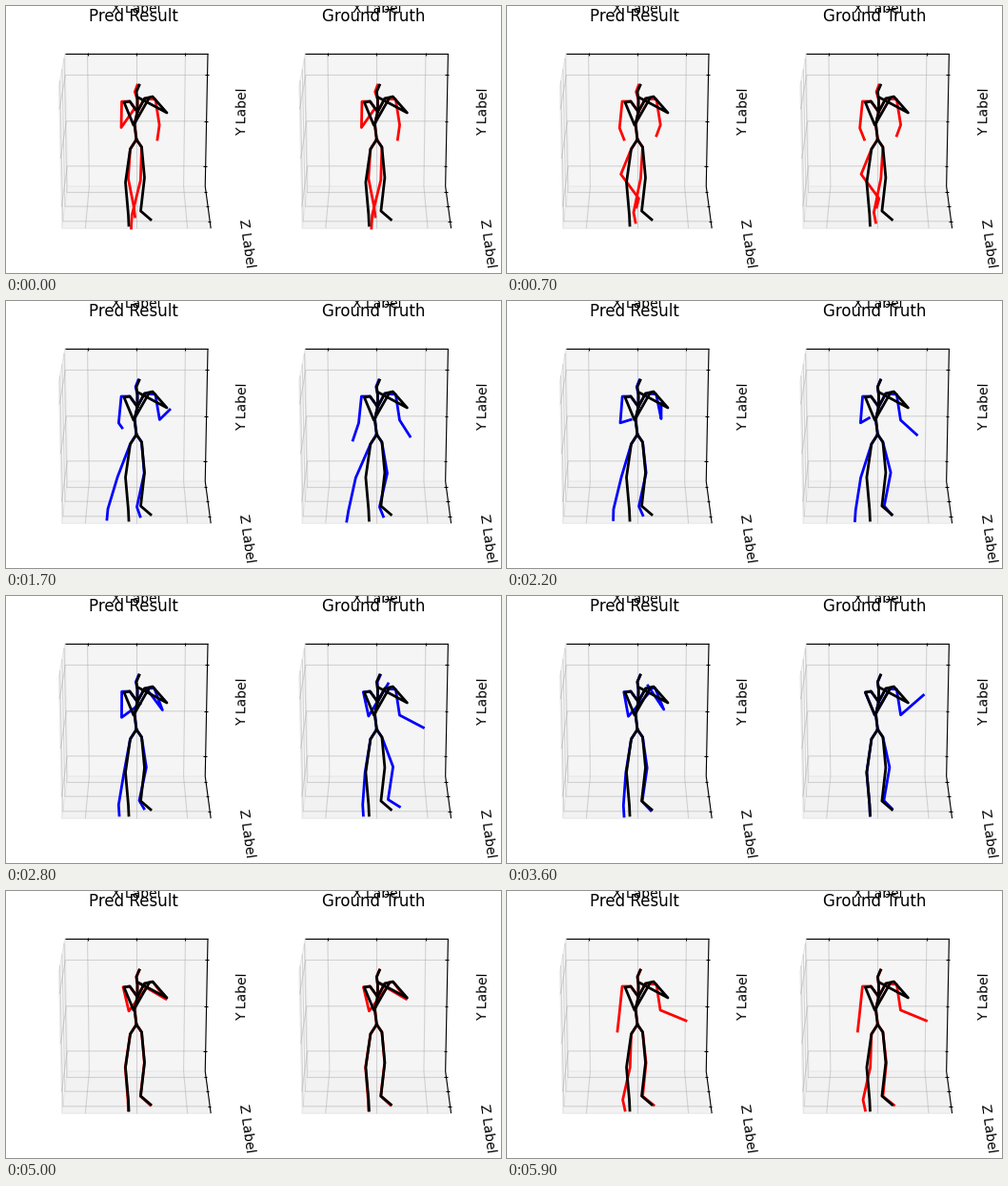
A matplotlib script for the animation above (6 s loop, 520x280 px).

```python
import numpy as np
import matplotlib.pyplot as plt
from matplotlib.animation import FuncAnimation
from matplotlib.collections import LineCollection
from matplotlib.patches import Polygon

WIDTH, HEIGHT, DPI = 520, 280, 100
STEP, FRAMES = 100, 60
PANEL_SHIFT = 252.4
TICKS = (-0.686, 0, 0.686)
TICK_OUT, TICK_IN = 1.3, 2.5
PREDICT_FROM, RESTART = 1000, 5000

plt.rcParams["font.family"] = "DejaVu Sans"


def points(*xy):
    return np.array(xy, float).reshape(-1, 2)


SPINE = points(137, 140, 135, 124, 138, 111)
HEAD = points(138, 98, 137, 90, 140, 83)

# Root, shoulder and elbow when folded, the same when opened
ARMS = {
    "left": (points(138, 111, 130, 100), points(124, 101, 134, 125),
             points(121, 100, 118, 128)),
    "right": (points(138, 111, 145.5, 97), points(154, 95, 169, 112),
              points(157, 98, 161, 125)),
}

# Root, resting knee and ankle, their share of the foot's shift and of the bend
LEGS = {
    "left": (points(137, 140, 130.5, 150), points(125.5, 185, 128.5, 219),
             (0.45, 0.9), (1, -0.4)),
    "right": (points(137, 140, 142.5, 148), points(145.5, 180, 141.5, 215),
              (0.3, 0.5), (1, 0.5)),
}

# Where hands (x, y) and feet (x, y, knee bend) rest
REST = {
    "left_hand": (150, 97),
    "right_hand": (139, 96),
    "left_foot": (129, 230, 0),
    "right_foot": (152, 224, 0),
}

# Key points as (ms, x, y[, bend]); the rest of the body follows
OBSERVED = {
    "left_hand": [(0, 134, 109), (700, 123, 140),
                  (5000, 148, 101), (5600, 118, 147), (5900, 116, 147)],
    "right_hand": [(0, 159, 140), (700, 157, 136),
                   (5000, 140, 97), (5600, 190, 134), (5900, 188, 136)],
    "left_foot": [(0, 135.5, 221, 0), (700, 136, 211, -9),
                  (5000, 128.5, 230, 0), (5900, 124, 230, 6)],
    "right_foot": [(0, 131.5, 233, 2), (700, 135, 227, 0),
                   (5000, 151.5, 224.5, 0), (5900, 154, 224.5, 0)],
}
PREDICTED = {
    "left_hand": [(1700, 122, 133), (2800, 141, 113), (3600, 148, 103)],
    "right_hand": [(1700, 172, 114), (2800, 149, 99), (3600, 148, 94)],
    "left_foot": [(1300, 103, 227, 2), (1700, 106, 229, 2),
                  (2800, 119, 230, 3), (3600, 123, 231, 2)],
    "right_foot": [(1700, 141, 226, 3), (2800, 145, 223, 4),
                   (3600, 151, 225, 2)],
}
TRUTH = {
    "left_hand": [(1700, 112, 146), (2800, 149, 92), (3600, 150, 97)],
    "right_hand": [(1300, 174, 141), (1700, 172, 142), (2800, 186, 138),
                   (3600, 185, 104), (4200, 139, 96)],
    "left_foot": [(1300, 103, 227, 0), (1700, 105.5, 231, 0),
                  (2800, 123, 230, 2), (3600, 129, 230, 0)],
    "right_foot": [(1700, 144, 226, 5), (2800, 161, 221, 6),
                   (3600, 152, 223, 4), (4200, 152, 224, 0)],
}


def merge(own):
    return {part: np.array(sorted(keys + own[part]), float)
            for part, keys in OBSERVED.items()}


def ease(track, t):
    """Smoothstep between the two keys around t."""
    times, values = track[:, 0], track[:, 1:]
    i = min(np.searchsorted(times, t, side="right"), len(times) - 1)
    u = (t - times[i - 1]) / (times[i] - times[i - 1])
    return values[i - 1] + (values[i] - values[i - 1]) * u * u * (3 - 2 * u)


def arm(side, hand):
    """The elbow opens as the hand leaves the face."""
    root, folded, opened = ARMS[side]
    away = np.hypot(*np.subtract(hand, REST[side + "_hand"]))
    shoulder, elbow = folded + (opened - folded) * (1 - np.exp(-away / 12))
    wrist = elbow + 0.68 * (hand - elbow)
    return np.vstack([root, shoulder, elbow, wrist, hand])


def leg(side, foot):
    """Knee and ankle follow the foot by fixed shares."""
    root, joints, follow, flex = LEGS[side]
    shift = foot[:2] - REST[side + "_foot"][:2]
    moved = joints + np.outer(follow, shift) + np.outer(flex, (foot[2], 0))
    return np.vstack([root, moved, foot[:2]])


def body(tips):
    tips = {part: np.array(tip, float) for part, tip in tips.items()}
    lean = 0.1 * (tips["right_foot"][0] - REST["right_foot"][0])
    lines = [np.vstack([SPINE, HEAD + np.outer((0, 0.8, 1), (lean, 0))])]
    for side in ("left", "right"):
        lines.append(arm(side, tips[side + "_hand"]))
        lines.append(leg(side, tips[side + "_foot"]))
    return lines


def project(x, y, z):
    """Perspective view of the unit box, elevation 110 and azimuth -90."""
    x, y, z = 0.5714 * x, 0.5714 * y, 0.4286 * z
    up = 0.9397 * y - 0.3420 * z
    depth = 10 - 0.3420 * y - 0.9397 * z
    return 137 + 1340 * x / depth, 139.65 - 1340 * up / depth


def draw_box(shift):
    def place(*corners):
        return [(px + shift, py) for px, py in (project(*c) for c in corners)]

    panes = [
        (((-1, -1, -1), (-1, 1, -1), (-1, 1, 1), (-1, -1, 1)), "#f9f9f9"),
        (((-1, -1, -1), (1, -1, -1), (1, -1, 1), (-1, -1, 1)), "#f2f2f2"),
        (((-1, -1, -1), (1, -1, -1), (1, 1, -1), (-1, 1, -1)), "#f5f5f5"),
    ]
    for corners, color in panes:
        ax.add_patch(Polygon(place(*corners), facecolor=color,
                             edgecolor="#e9e9e9", linewidth=0.8, zorder=1))

    grid, marks = [], []
    for v in TICKS:
        grid += [
            place((v, 1, -1), (v, -1, -1), (v, -1, 1)),
            place((1, v, -1), (-1, v, -1), (-1, v, 1)),
            place((-1, 1, v), (-1, -1, v), (1, -1, v)),
        ]
        (tx, ty), = place((v, 1, -1))
        marks.append([(tx, ty - TICK_OUT), (tx, ty + TICK_IN)])
        for corner in ((1, v, -1), (1, -1, v)):
            (tx, ty), = place(corner)
            marks.append([(tx - TICK_IN, ty), (tx + TICK_OUT, ty)])
    edges = place((-1, 1, -1), (1, 1, -1), (1, -1, -1), (1, -1, 1))
    ax.add_collection(LineCollection(grid, colors="#b0b0b0", alpha=0.5,
                                     linewidths=0.8, zorder=2))
    ax.add_collection(LineCollection(marks + [edges[:2], edges[1:3], edges[2:]],
                                     colors="black", linewidths=0.8, zorder=3))


def draw_labels(title, shift):
    labels = [
        (title, 134, 16, 12, 0),
        ("X Label", 137.2, 7, 10, 0),
        ("Y Label", 253, 110.7, 10, 89),
        ("Z Label", 248.7, 249, 10, -82),
    ]
    for text, x, y, size, angle in labels:
        ax.text(x + shift, y, text, fontsize=size, rotation=angle,
                ha="center", va="baseline", rotation_mode="anchor", zorder=6)


def draw_body(shift, color, zorder):
    return [ax.plot(xy[:, 0] + shift, xy[:, 1], color=color, lw=2,
                    zorder=zorder, solid_joinstyle="round")[0]
            for xy in body(REST)]


fig = plt.figure(figsize=(WIDTH / DPI, HEIGHT / DPI), dpi=DPI, facecolor="white")
ax = fig.add_axes([0, 0, 1, 1])
ax.set_axis_off()

panels = []
for title, own, shift in (("Pred Result", PREDICTED, 0),
                          ("Ground Truth", TRUTH, PANEL_SHIFT)):
    draw_box(shift)
    draw_labels(title, shift)
    draw_body(shift, "black", 5)
    panels.append((shift, merge(own), draw_body(shift, "red", 4)))

ax.set_xlim(0, WIDTH)
ax.set_ylim(HEIGHT, 0)


def update(i):
    t = i * STEP
    color = "blue" if PREDICT_FROM <= t < RESTART else "red"
    artists = []
    for shift, tracks, lines in panels:
        pose = body({part: ease(track, t) for part, track in tracks.items()})
        for line, xy in zip(lines, pose):
            line.set_data(xy[:, 0] + shift, xy[:, 1])
            line.set_color(color)
        artists += lines
    return artists


anim = FuncAnimation(fig, update, frames=FRAMES, interval=STEP,
                     repeat=True, repeat_delay=0, blit=False)
plt.show()
```
